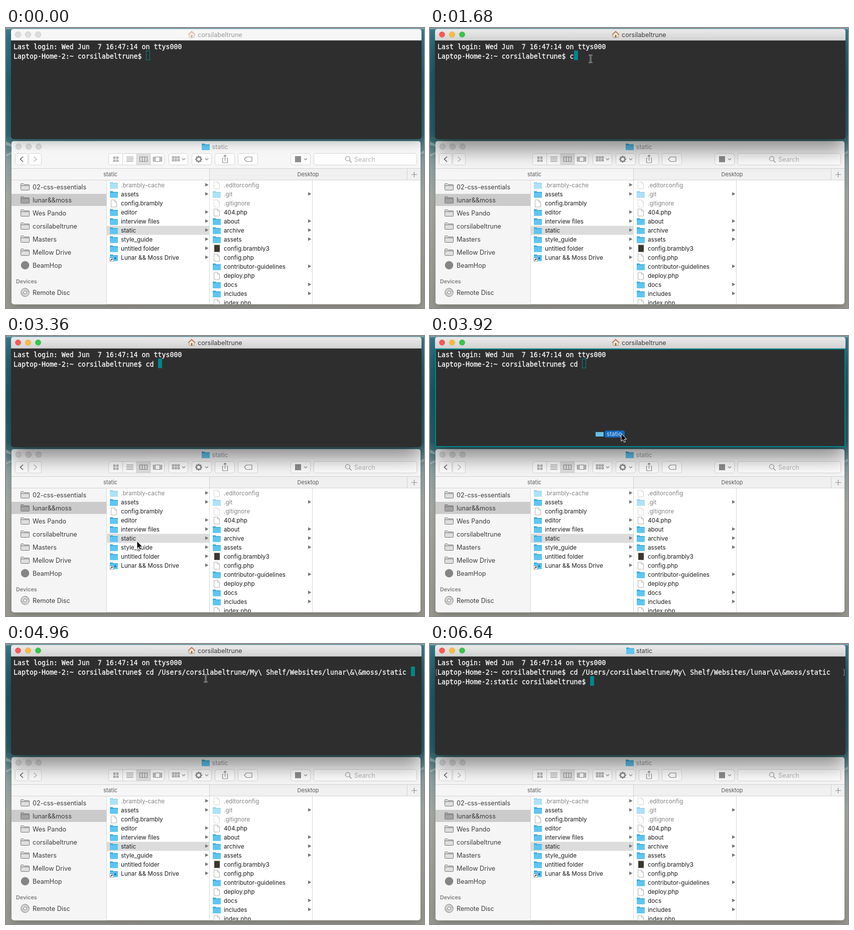
Write an HTML page that moves like this. It is 833 by 557 pixels and loops after 8000 ms.

```html
<!DOCTYPE html>
<html lang="en">
<head>
<meta charset="utf-8">
<title>Drag a folder into the terminal</title>
<style>
html, body { margin: 0; width: 100%; height: 100%; overflow: hidden; }
svg { display: block; }
text { font: 11.75px Inter, "Open Sans", sans-serif; fill: #1c1c1c; white-space: pre; }
.ui { font-size: 12.6px; fill: #3c3c3c; }
.tab { font-size: 11px; fill: #5a5a5a; text-anchor: middle; }
.term { font: 13.289px "DejaVu Sans Mono", monospace; fill: #fff; stroke: #fff; stroke-width: .3; }
.button { fill: #fdfdfd; stroke: #d6d6d6; }
.glyph { fill: none; stroke: #8c8c8c; stroke-width: 1.2; }
</style>
</head>
<body>
<svg id="stage" width="833" height="557" viewBox="0 0 833 557"></svg>
<script>
const LOOP = 8000, STEP = 80;
const USER = "corsilabeltrune", HOST = "Laptop-Home-2";
const PROMPT = `${HOST}:~ ${USER}$ `;
const PATH = `/Users/${USER}/My\\ Shelf/Websites/lunar\\&\\&moss/static `;
const TIME = { activate: 1120, beam: 1200, drag: 3520, drop: 4960, enter: 6640 };
const CELL = 8, TERM_X = 15, TERM_BOTTOM = 221;

// Pointer way-points: time, x, y; "ease" smooths the stretch leading to that point.
const POINTER = [
  [240, 845, 170], [1040, 319.5, 60.5, "ease"], [2560, 320, 61],
  [3360, 261, 408, "ease"], [3440, 261, 408], [3920, 381, 194],
  [4240, 398, 54], [4320, 398, 54], [4480, 398, 60], [4560, 398, 60],
  [4800, 398, 68], [5360, 398, 68], [5920, 850, 105, "ease"]
];

const escapeText = s => s.replace(/&/g, "&amp;");
const text = (x, y, s, cls = "", extra = "") => `<text x="${x}" y="${y}" class="${cls}" ${extra}>${escapeText(s)}</text>`;
const rect = (x, y, w, h, attrs) => `<rect x="${x}" y="${y}" width="${w}" height="${h}" ${attrs}/>`;
const path = (d, attrs = 'class="glyph"') => `<path d="${d}" ${attrs}/>`;
const use = (id, x, y, extra = "") => `<use href="#${id}" x="${x}" y="${y}" ${extra}/>`;
const lights = (y, x, fills, stroke) => fills.map((fill, i) =>
  `<circle cx="${x + 20 * i}" cy="${y}" r="5.7" fill="${fill}" stroke="${stroke}" stroke-width=".8"/>`).join("");
const shadow = (id, dy, blur, alpha) => `<filter id="${id}" filterUnits="userSpaceOnUse" x="-80" y="-80" width="1000" height="720">
  <feDropShadow dx="0" dy="${dy}" stdDeviation="${blur}" flood-color="#000" flood-opacity="${alpha}"/></filter>`;

const defs = `<defs>
  ${shadow("softShadow", 8, 10, .22)}${shadow("deepShadow", 20, 20, .46)}
  <linearGradient id="sea" x2="0" y2="1">
    <stop stop-color="#8fb0b4"/><stop offset=".008" stop-color="#36788a"/>
    <stop offset=".2" stop-color="#1f6472"/><stop offset=".38" stop-color="#2b6973"/>
    <stop offset=".47" stop-color="#8ca4a4"/><stop offset=".6" stop-color="#a8aca6"/>
    <stop offset="1" stop-color="#9a9a91"/>
  </linearGradient>
  <linearGradient id="activeBar" x2="0" y2="1"><stop stop-color="#ebebeb"/><stop offset="1" stop-color="#d3d3d3"/></linearGradient>
  <clipPath id="finderClip"><rect x="11" y="225" width="815" height="324.5" rx="5"/></clipPath>
  <g id="folder">
    ${path("M0 2q0-1 1-1h4.5l1.3 1.5H15q1 0 1 1V13q0 1-1 1H1q-1 0-1-1z", 'fill="#38a9db"')}
    ${path("M0 4h16v9q0 1-1 1H1q-1 0-1-1z", 'fill="#5ec6f2"')}
  </g>
  <g id="file">${path("M2.5 .5h7l4 4v10h-11zM9.5 .5v4h4", 'fill="#fff" stroke="#b0b0b0"')}</g>
  <g id="package">${rect(3, 0, 11, 14, 'fill="#3b372f"')}</g>
  <g id="alias">${use("folder", 0, 0)}${rect(0, 8, 7, 7, 'fill="#fff" stroke="#777" stroke-width=".6"')}
    ${path("M1.5 13.5q0-3 3.5-3M3.4 9l2 1.5-2 1.6", 'fill="none" stroke="#111"')}
    ${path("M8 10.5q0-2.5 2.7-2.5t2.7 2.5zM9.2 6.2h3v2h-3z", 'fill="#1e7fb0"')}</g>
  <g id="sideFolder">${path("M.5 2.5q0-1 1-1h4l1.5 2h9.5q1 0 1 1v9q0 1-1 1h-15q-1 0-1-1zM.5 5.5h17", 'stroke="#777"')}</g>
  <g id="house">
    ${path("M2 6v7h10V6L7 2z", 'fill="#f4ead8" stroke="#9b8568" stroke-width=".8"')}
    ${path("M0 7.5L7 1l7 6.5", 'fill="none" stroke="#c0694a" stroke-width="1.7"')}
    ${rect(5.5, 8, 3, 5, 'fill="#a0683c"')}
  </g>
</defs>`;

function column(x, width, items) {
  return items.map(([name, icon, options = ""], i) => {
    const y = 312.5 + 18 * i, dim = options.includes("dim");
    return (options.includes("selected") ? rect(x, y - 9, width, 18, 'fill="#dcdcdc"') : "")
      + use(icon, x + 6, y - 7, dim ? 'opacity=".5"' : "")
      + text(x + 28, y + 4.2, name, "", dim ? 'style="fill:#858585"' : "")
      + (icon === "folder" || icon === "alias" ? path(`M${x + 196} ${y - 4}l6.5 3.5-6.5 3.5z`, 'fill="#777"') : "");
  }).join("");
}

function sidebar() {
  const names = ["02-css-essentials", "lunar&&moss", "Wes Pando", USER, "Masters", "Mellow Drive", "BeamHop"];
  return rect(11, 303, 189, 247, 'fill="#f5f5f5"') + rect(11, 330, 189, 24, 'fill="#cbcbcb"')
    + names.map((name, i) => {
      const y = 316 + 26 * i;
      const icon = i === 6 ? `<circle cx="38" cy="${y}" r="8.3" fill="#858585"/>`
        : use("sideFolder", 29, y - 8, `fill="${i === 1 ? "#a3a3a3" : "#dedede"}"`);
      return icon + text(53, y + 4.6, name, "ui");
    }).join("")
    + text(20, 508, "Devices", "", 'style="font-size:10.8px;font-weight:600;fill:#7b7b7b"')
    + '<circle cx="38" cy="526" r="8.3" fill="#d5d5d5" stroke="#888"/><circle cx="38" cy="526" r="3" fill="#f5f5f5" stroke="#888"/>'
    + path("M38 518q5 1 7 5l-5 2M38 534q-5-1-7-5l5-2", 'fill="none" stroke="#aaa"')
    + text(53, 530.6, "Remote Disc", "ui");
}

function toolbar() {
  const buttons = [[18, 26], [45, 26], [204, 112], [324, 39], [370, 40], [416, 40], [462, 40], [567, 40], [613, 206]];
  const tiles = (x, y, columns, rows, w, gap) => Array.from({ length: columns * rows }, (_, i) =>
    rect(x + i % columns * gap, y + Math.floor(i / columns) * gap, w, w, 'class="glyph"')).join("");
  const chevron = x => path(`M${x} 259.5l3 3 3-3`);
  const spokes = Array.from({ length: 8 }, (_, i) =>
    rect(382.8, 254, 2.4, 3, `fill="#8c8c8c" transform="rotate(${45 * i} 384 261)"`)).join("");
  return buttons.map(([x, w]) => rect(x + .5, 249.5, w - 1, 23, 'rx="4" class="button"')).join("")
    + rect(260, 250, 28, 22, 'fill="#dedede"')
    + path("M232.5 250v22M260 250v22M288 250v22", 'stroke="#d6d6d6"')
    + path("M34 256l-5.5 5 5.5 5", 'fill="none" stroke="#555" stroke-width="1.5"')
    + path("M55.5 256l5.5 5-5.5 5", 'fill="none" stroke="#bbb" stroke-width="1.5"')
    + tiles(214.5, 256.5, 2, 2, 3, 6)
    + path("M240 256.5h14M240 259.5h14M240 262.5h14M240 265.5h14")
    + path("M266.5 256.5h15v9h-15zM271.5 256.5v9M276.5 256.5v9")
    + path("M297.5 256.5h9v9h-9zM293.5 256v10M295.5 256v10M308.5 256v10M310.5 256v10")
    + tiles(331.5, 256, 3, 2, 3, 5.5) + chevron(351)
    + spokes + '<circle cx="384" cy="261" r="4.4" class="glyph" style="stroke-width:2.6"/>' + chevron(397)
    + path("M433.5 259h-2v9h10v-9h-2M436.5 264v-11M433.8 255.5l2.7-2.7 2.7 2.7")
    + path("M475 261l4-4.5h11v9h-11z")
    + rect(576, 255, 12, 12, 'fill="#8c8c8c"') + chevron(594)
    + '<circle cx="681" cy="260" r="4.5" class="glyph"/>' + path("M684.5 263.5l4 4")
    + text(694, 265.8, "Search", "ui", 'style="fill:#b5b5b5"');
}

function finder() {
  const first = [[".brambly-cache", "folder", "dim"], ["assets", "folder"], ["config.brambly", "file"],
    ["editor", "folder"], ["interview files", "folder"], ["static", "folder", "selected"],
    ["style_guide", "folder"], ["untitled folder", "folder"], ["Lunar && Moss Drive", "alias"]];
  const second = [[".editorconfig", "file", "dim"], [".git", "folder", "dim"], [".gitignore", "file", "dim"],
    ["404.php", "file"], ["about", "folder"], ["archive", "folder"], ["assets", "folder"],
    ["config.brambly3", "package"], ["config.php", "file"], ["contributor-guidelines", "folder"],
    ["deploy.php", "file"], ["docs", "folder"], ["includes", "folder"], ["index.php", "file"]];
  return rect(11, 225, 815, 324.5, 'rx="5" fill="#fff" filter="url(#softShadow)"')
    + `<g clip-path="url(#finderClip)">`
    + rect(11, 225, 815, 78, 'fill="#f6f6f6"') + rect(406, 280, 420, 22, 'fill="#f0f0f0"')
    + lights(236, 25, ["#dcdcdc", "#dcdcdc", "#dcdcdc"], "#c6c6c6")
    + use("folder", 390, 229) + text(410.5, 241.4, "static", "ui", 'style="fill:#999"')
    + toolbar() + sidebar()
    + path("M11 279.5h815M11 302.5h815M405.5 280v22M799.5 280v22", 'stroke="#d2d2d2"')
    + text(208, 295, "static", "tab") + text(602, 295, "Desktop", "tab") + path("M808 291.5h11M813.5 286v11")
    + column(201, 204, first) + column(406, 204, second)
    + path("M200.5 303v247M405.5 303v247M610.5 303v247", 'stroke="#dadada"') + "</g>";
}

const terminal = `
  <g id="window">${rect(10, 2, 818, 219, 'rx="5" fill="#2d2d2d"')}</g>
  <path id="bar" d="M10 24V7q0-5 5-5H823q5 0 5 5V24z"/>
  <path d="M10 24.5H828" stroke="#b5b5b5"/>
  <g id="idleLights">${lights(13, 24, ["#dcdcdc", "#dcdcdc", "#dcdcdc"], "#c6c6c6")}</g>
  <g id="liveLights">${lights(13, 24, ["#fc5753", "#fdbc40", "#33c748"], "#0002")}</g>
  <g id="homeTitle">${use("house", 363, 6)}${text(382, 17.6, USER, "ui")}</g>
  <g id="folderTitle">${use("folder", 391, 6)}${text(411, 17.6, "static", "ui")}</g>
  ${text(TERM_X, 42, "Last login: Wed Jun  7 16:47:14 on ttys000", "term")}
  <rect id="caret" width="7" height="18" stroke="#00868b"/>
  <text id="command" x="${TERM_X}" y="61" class="term"></text>
  <g id="result">${path("M14.5 50.5h-2v12h2M823.5 50.5h2v12h-2", 'fill="none" stroke="#999"')}
    ${text(TERM_X, 80, `${HOST}:static ${USER}$ `, "term")}</g>
  ${rect(11, 26, 816, 194, 'id="dropFrame" fill="none" stroke="#00868b" stroke-width="2"')}
  <g id="pointer">
    <g id="dragged">${rect(-51, -3, 16, 9, 'fill="#62bfe2"')}${rect(-33, -6, 40, 14, 'rx="4" fill="#1268bd"')}
      ${text(-29, 5, "static", "", 'style="fill:#d3e4f5"')}</g>
    <path id="arrow" d="M0 0V15.3L3.5 12.1 5.9 17.4 8.4 16.3 6.1 11.2H10.8Z" fill="#000" stroke="#fff"/>
    <g id="beam" fill="none">${["#c4c4c4", "#222"].map((color, i) =>
      path("M-3.5-7Q0-7 0-4.5Q0-7 3.5-7M0-4.5V5M-3.5 7.5Q0 7.5 0 5Q0 7.5 3.5 7.5M-2 2H2", `stroke="${color}" stroke-width="${i ? 1 : 2.6}"`)).join("")}</g>
  </g>`;

const stage = document.getElementById("stage");
stage.innerHTML = defs + rect(0, 0, 833, 557, 'fill="url(#sea)"')
  + path("M0 226l11 5v5l-11-3zM0 251l11-4v4l-11 5zM826 248l7-4v5l-7 3z", 'fill="#c6d2d0" opacity=".5"')
  + finder() + terminal;

const part = Object.fromEntries([...stage.querySelectorAll("[id]")].map(node => [node.id, node]));
const set = (id, attrs) => Object.entries(attrs).forEach(([key, value]) => part[id].setAttribute(key, value));
const show = (id, on) => set(id, { display: on ? "inline" : "none" });

function pointerAt(t) {
  const next = POINTER.findIndex(point => point[0] > t);
  if (next < 1) return null;
  const [t0, x0, y0] = POINTER[next - 1], [t1, x1, y1, ease] = POINTER[next];
  let k = (t - t0) / (t1 - t0);
  if (ease) k = k * k * (3 - 2 * k);
  return [x0 + (x1 - x0) * k, y0 + (y1 - y0) * k];
}

function typedAt(t) {
  if (t >= TIME.drop) return "cd " + PATH;
  return "cd ".slice(0, [1680, 1840, 2160].filter(key => t >= key).length);
}

function draw(t) {
  const active = t >= TIME.activate, entered = t >= TIME.enter;
  const dragging = t >= TIME.drag && t < TIME.drop;
  const position = pointerAt(t);
  const overTerminal = position && position[1] < TERM_BOTTOM;
  const dropping = dragging && overTerminal;

  set("window", { filter: `url(#${active ? "deepShadow" : "softShadow"})` });
  set("bar", { fill: active ? "url(#activeBar)" : "#f6f6f6" });
  show("idleLights", !active);
  show("liveLights", active);
  set("homeTitle", { opacity: active ? 1 : .5 });
  show("homeTitle", !entered);
  show("folderTitle", entered);

  const line = PROMPT + typedAt(t);
  part.command.textContent = line;
  const cells = entered ? `${HOST}:static ${USER}$ `.length : line.length;
  set("caret", {
    x: TERM_X + cells * CELL + .5, y: entered ? 64.5 : 45.5,
    fill: active && !dropping ? "#00868b" : "none"
  });
  show("result", entered);
  show("dropFrame", dropping);

  show("pointer", position);
  if (!position) return;
  const beam = t >= TIME.beam && overTerminal && !dragging;
  set("pointer", { transform: `translate(${position.map(Math.round)})` });
  show("beam", beam);
  show("arrow", !beam);
  show("dragged", dragging);
}

const start = performance.now();
function tick() {
  const t = (performance.now() - start) % LOOP;
  draw(Math.floor(t / STEP) * STEP);
  requestAnimationFrame(tick);
}
tick();
</script>
</body>
</html>
```
